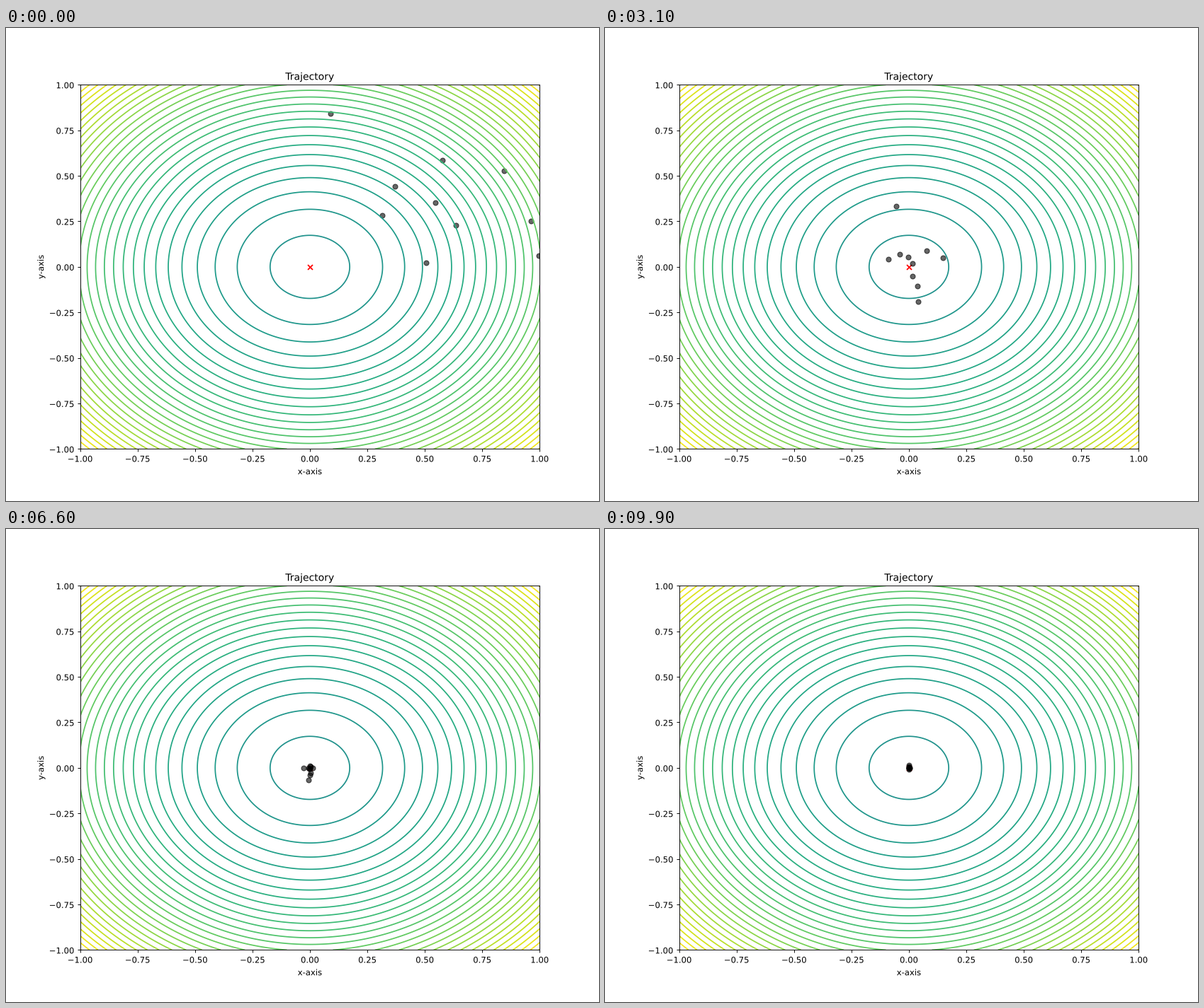
These frames come from a looping animation (837x669 px, 10000 ms). A matplotlib script:

```python
import numpy as np
import matplotlib.pyplot as plt
from matplotlib.animation import FuncAnimation
from matplotlib.patheffects import Normal
from matplotlib.text import Text

DPI = 83.7
FRAMES = 100
START = np.array([(.09, .842), (.578, .584), (.846, .528), (.371, .441),
                  (.546, .353), (.962, .253), (.314, .281), (.634, .23),
                  (.505, .022), (.996, .061)])

# Each axis of each particle is a damped swing about the optimum.
rng = np.random.default_rng(12)
shape = START.shape
swing = rng.uniform(0.1, 1.2, shape)
omega = rng.uniform(0.35, 0.65, shape)
decay = rng.uniform((0.037, 0.021), 0.1, shape)


def positions(t):
    wave = START * np.cos(omega * t) + swing * np.sin(omega * t)
    return np.exp(-decay * t) * wave


fig, ax = plt.subplots(figsize=(837 / DPI, 669 / DPI), dpi=DPI)
ax.set_title("Trajectory", fontsize="large")
ax.set_xlabel("x-axis")
ax.set_ylabel("y-axis")

grid = np.linspace(-1, 1, 401)
xx, yy = np.meshgrid(grid, grid)
ax.contour(xx, yy, xx ** 2 + yy ** 2, levels=np.arange(-2, 2, 0.07))
ax.set_xlim(-1, 1)
ax.set_ylim(-1, 1)
ax.scatter(0, 0, color="red", marker="x")
dots = ax.scatter(*START.T, c="black", alpha=0.6)

# Outlined text keeps its place between whole pixels.
fig.canvas.draw()
for label in fig.findobj(Text):
    label.set_path_effects([Normal()])


def update(i):
    dots.set_offsets(positions(i))
    return (dots,)


anim = FuncAnimation(fig, update, frames=FRAMES, interval=100,
                     repeat=True, repeat_delay=0)
plt.show()
```
